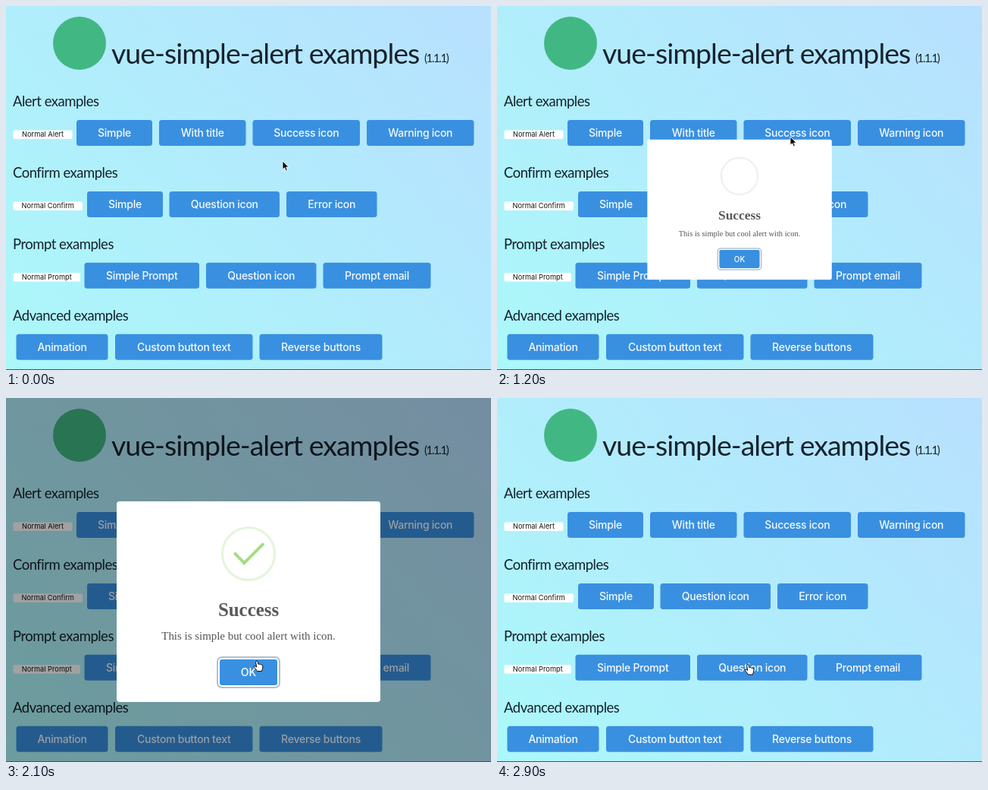
Animation of 640x479 px, one loop 3 s. Source, as an HTML page:

```html
<!DOCTYPE html>
<html lang="en">
<head>
<meta charset="utf-8">
<title>vue-simple-alert examples</title>
<style>
html, body { margin: 0; width: 100%; height: 100%; overflow: hidden; }
#stage {
  position: relative; width: 640px; height: 479px; overflow: hidden;
  background: linear-gradient(45deg, #abf8f9, #b8e0ff);
}
#stage > svg, #dim { position: absolute; left: 0; top: 0; width: 640px; height: 479px; }
#dim { background: rgba(0, 0, 0, .37); }
.h1 { font: 37.5px Lato, sans-serif; letter-spacing: -1px; fill: #16222e; }
.ver { font: 15px Lato, sans-serif; letter-spacing: -1.4px; fill: #16222e; }
.h2 { font: 18.5px Lato, sans-serif; letter-spacing: -.5px; fill: #16222e; }
.btn { font: 500 14px Inter, sans-serif; letter-spacing: -.25px; fill: #f4f9fe; text-anchor: middle; }
.plain { font: 9.25px Inter, sans-serif; fill: #111; text-anchor: middle; }
#popup {
  position: absolute; left: 146px; top: 136px; width: 348px; height: 263.5px;
  border-radius: 4px; background: #fff; font-size: 13.27px;
}
#popup p {
  position: absolute; left: 0; width: 100%; margin: 0; text-align: center; white-space: nowrap;
  font-family: "Liberation Serif", "Times New Roman", serif;
}
#popup .title { top: 127.7px; font-size: 1.875em; font-weight: bold; line-height: 30px; color: #595959; }
#popup .text { top: 167.3px; font-size: 1.125em; line-height: 20px; color: #545454; }
#ok {
  position: absolute; left: 136px; top: 208px; width: 76px; height: 34px; border-radius: 3px;
  background: #3990e0; color: #fff; text-align: center;
  font: 500 14.1px/34px Inter, sans-serif;
  box-shadow: 0 0 0 2px #fff, 0 0 0 4px rgba(50, 100, 150, .4);
}
#icon {
  position: absolute; left: calc(174px - 2.75em); top: calc(69px - 2.75em);
  width: 5em; height: 5em; border: .25em solid; border-radius: 50%;
}
#icon i { position: absolute; height: .3125em; border-radius: .125em; background: #a5dc86; }
#tip { transform: rotate(45deg); }
#long { transform: rotate(-45deg); }
</style>
</head>
<body>
<div id="stage">
  <svg id="page" viewBox="0 0 640 479">
    <circle cx="97" cy="49" r="35" fill="#41b883"/>
    <text class="h1" x="139" y="75.5">vue-simple-alert examples</text>
    <text class="ver" x="552" y="74">(1.1.1)</text>
  </svg>
  <div id="dim"></div>
  <div id="popup">
    <div id="icon"><i id="tip"></i><i id="long"></i></div>
    <p class="title">Success</p>
    <p class="text">This is simple but cool alert with icon.</p>
    <div id="ok">OK</div>
  </div>
  <svg viewBox="0 0 640 479">
    <rect y="478" width="640" height="1" fill="#0f7a1c"/>
    <g id="cursor">
      <path id="arrow" d="M0 0V11.2L2.6 8.8L4.4 12.8L6.3 12L4.6 8.1H8Z"
        fill="#000" stroke="#fff" stroke-width=".9"/>
      <path id="hand" fill="#fff" stroke="#111" stroke-width="1" stroke-linejoin="round"
        d="M-1.4 1.6Q0 -.6 1.2 1.4L2 5Q3.4 3.6 4.2 5.2Q5.6 4.2 6.2 5.8Q8 5.2 8 7.4L7.4 11L6.4 14H.4L-1.6 11L-4 8.2Q-3.6 6.2 -1.8 7.6L-.4 8.6Z"/>
    </g>
  </svg>
</div>
<script>
const LOOP = 3000, STEP = 100;
const OPEN = 1200, DIM = 1300, CLOSE = 2475, GONE = 2650;
const $ = id => document.getElementById(id);

function add(tag, attrs, text = '') {
  const el = document.createElementNS('http://www.w3.org/2000/svg', tag);
  for (const key in attrs) el.setAttribute(key, attrs[key]);
  el.textContent = text;
  $('page').append(el);
}

function button(x, y, width, height, label, fill, cls, drop) {
  add('rect', { x, y, width, height, rx: cls === 'btn' ? 3.5 : 2, fill });
  add('text', { class: cls, x: x + width / 2, y: y + height / 2 + drop }, label);
}

// Section name, native button width, then [label, x, width]
const rows = [
  ['Alert', 78, ['Simple', 93, 100], ['With title', 202, 114.5], ['Success icon', 325.5, 141.5], ['Warning icon', 476, 141.5]],
  ['Confirm', 91.5, ['Simple', 107, 100], ['Question icon', 215.5, 145.5], ['Error icon', 370, 119.5]],
  ['Prompt', 88.5, ['Simple Prompt', 103.5, 151.5], ['Question icon', 264, 145.5], ['Prompt email', 418.5, 142]],
  ['Advanced', 0, ['Animation', 13.5, 121], ['Custom button text', 144, 181.5], ['Reverse buttons', 334.5, 162]]
];
rows.forEach(([name, plain, ...buttons], i) => {
  const y = 150 + i * 93.9;
  add('text', { class: 'h2', x: 9, y: y - 18 }, name + ' examples');
  if (plain) button(9.5, y + 13.5, plain, 11.5, 'Normal ' + name, '#fff', 'plain', 3.2);
  for (const [label, x, w] of buttons) button(x, y, w, 34, label, '#3990e0', 'btn', 5);
});

// Paused animations, driven by the clock
const anims = [];
function track(el, start, duration, frames, fill = 'both') {
  const anim = el.animate(frames.map(f => ({ easing: 'ease', ...f })), { duration, fill });
  anim.pause();
  anims.push({ anim, start });
}
const scale = (s, offset, opacity = 1) => ({ transform: `scale(${s})`, offset, opacity });
track($('popup'), OPEN, 300, [scale(.7, 0), scale(1.05, .45), scale(.95, .8), scale(1, 1)]);
track($('popup'), CLOSE, 150, [scale(1, 0), scale(.5, 1, 0)], 'forwards');

const bar = side => (offset, top, pos, width) =>
  ({ offset, top: top + 'em', [side]: pos + 'em', width: width + 'em' });
const tip = bar('left'), long = bar('right');
track($('tip'), OPEN, 750, [
  tip(0, 1.1875, .0625, 0), tip(.54, 1.0625, .125, 0), tip(.7, 2.1875, -.375, 3.125),
  tip(.84, 3, 1.3125, 1.0625), tip(1, 2.8125, .875, 1.5625)
]);
track($('long'), OPEN, 750, [
  long(0, 3.375, 2.875, 0), long(.65, 3.375, 2.875, 0),
  long(.84, 2.375, 0, 3.4375), long(1, 2.375, .5, 2.9375)
]);

const path = [
  [0, 365, 204], [200, 365, 204], [700, 386, 174], [1200, 387, 172],
  [1400, 388, 173], [2000, 331, 345], [2500, 331, 350], [LOOP, 331, 350]
];
function pointer(t) {
  const i = path.findIndex(p => p[0] > t);
  const [t0, x0, y0] = path[i - 1], [t1, x1, y1] = path[i];
  const k = (t - t0) / (t1 - t0), e = k * k * (3 - 2 * k);
  return [x0 + (x1 - x0) * e, y0 + (y1 - y0) * e];
}

const show = (el, on) => { el.style.visibility = on ? 'visible' : 'hidden'; };

function draw(t) {
  const open = t >= OPEN && t < GONE;
  show($('popup'), open);
  show($('dim'), t >= DIM && t < GONE);
  $('icon').style.borderColor = t < DIM ? '#efefef' : 'rgba(165, 220, 134, .3)';
  for (const { anim, start } of anims) anim.currentTime = t - start;

  const [x, y] = pointer(t);
  const onOk = t < CLOSE && y > 343 && x < 358;
  const hand = open ? onOk : t >= GONE || y < 184;
  $('cursor').setAttribute('transform', `translate(${x} ${y})`);
  show($('hand'), hand);
  show($('arrow'), !hand);
}

const begin = performance.now();
function tick() {
  const t = (performance.now() - begin) % LOOP;
  draw(Math.floor(t / STEP) * STEP);
  requestAnimationFrame(tick);
}
tick();
</script>
</body>
</html>
```
